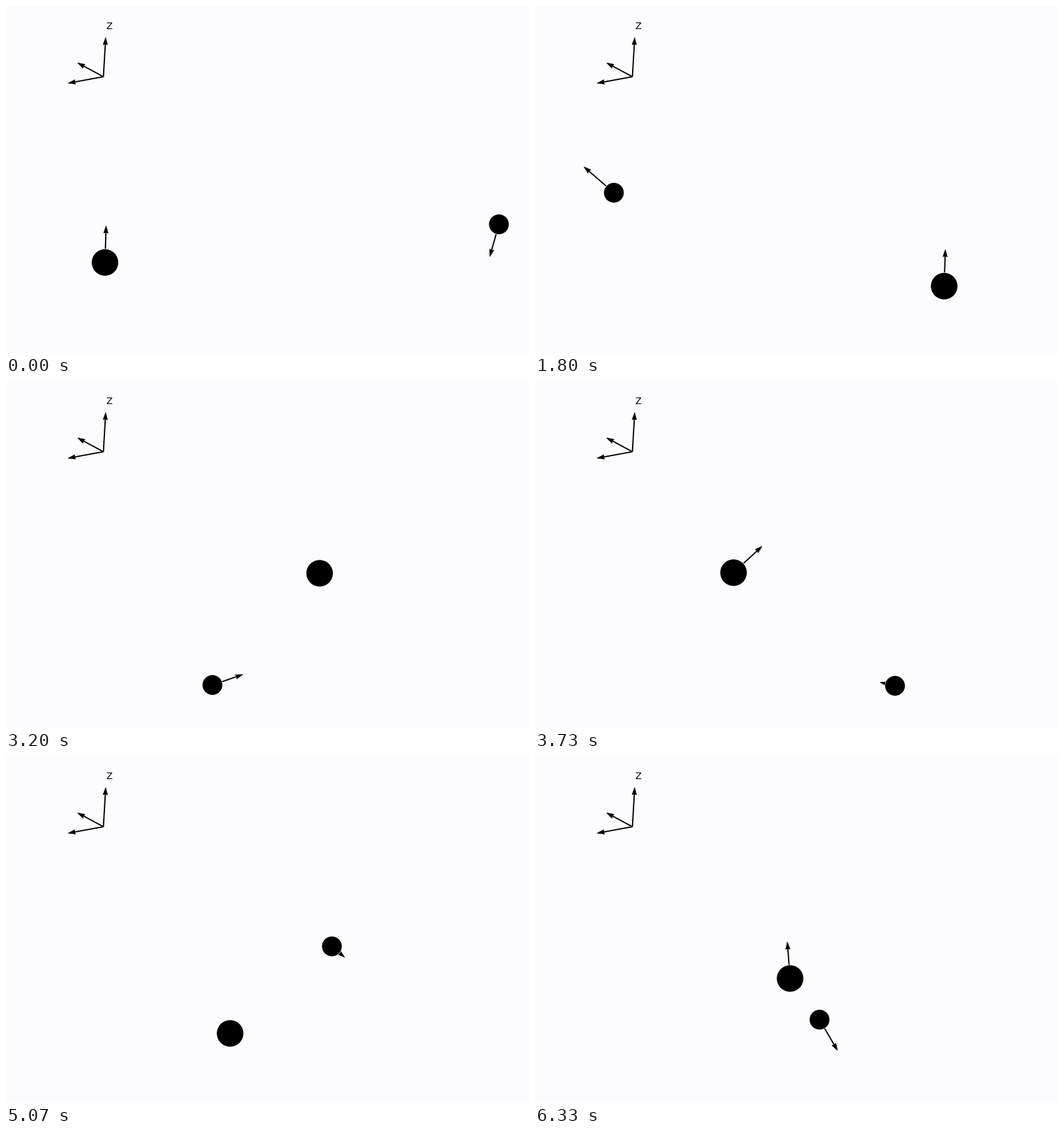
A matplotlib script for the animation above (6360 ms loop, 792 px wide and 526 px high).

```python
import numpy as np
import matplotlib.pyplot as plt
from matplotlib.animation import FuncAnimation
from matplotlib.patches import Circle, Polygon

W, H, DPI = 792, 526, 100
PX = 72 / DPI             # one pixel in points
LOOP, TICK = 6360, 20
STEP = 100 / 3            # the picture is renewed 30 times a second
MERGER = 6367             # time at which the inspiral would end
BG, INK = "#fcfcfe", "black"
CENTER = np.array([405.4, 364.0])
SHARE = 0.4283             # mass share of the small body
SHEAR, FLAT = 0.055, 0.338  # projection of the orbital plane

fig = plt.figure(figsize=(W / DPI, H / DPI), dpi=DPI, facecolor=BG)
ax = fig.add_axes([0, 0, 1, 1])
ax.set_xlim(0, W)
ax.set_ylim(H, 0)
ax.axis("off")


def clock(t):
    """Inspiral phase from 0 to 1, faster and faster towards the merger."""
    return 1 - (1 - t / MERGER) ** 0.625


def orbit(c):
    """Offset of the small body from the big one, on screen."""
    wobble = 1.2 * np.sin(2 * np.pi * c) - 0.9 * np.sin(np.pi * c)
    a = np.radians(24.2 + 646.2 * c + wobble)
    d = (654 + 9 * c) * (1 - c) ** 0.4
    x = d * np.cos(a)
    return np.array([x, SHEAR * x - FLAT * d * np.sin(a)])


# Spin angles in degrees at a few times
TIMES = np.array([0, 1030, 2630, 3730, 4530, 5570, 6330])
BIG_TURN = [88, 348, 563, 746, 851, 1171, 1535]
SMALL_TURN = [254, 400, 648, 837, 990, 1317, 1743]


def cone(c, turns, rx, ry, lift):
    """Tip of a spin vector that circles a raised or lowered centre."""
    a = np.radians(np.interp(c, clock(TIMES), turns))
    return np.array([rx * np.cos(a), -lift - ry * np.sin(a)])


def big_spin(c):
    return cone(c, BIG_TURN, 48, 27.5, 28)


def small_spin(c):
    lift = 95 * c ** 0.2 * np.exp(-(c / 0.4) ** 4) - 32.5
    return cone(c, SMALL_TURN, 50, 17, lift)


class Arrow:
    def __init__(self, z=1):
        self.line, = ax.plot([], [], color=INK, lw=1.9 * PX,
                             solid_capstyle="butt", zorder=z)
        self.head = Polygon(np.zeros((4, 2)), fc=INK, ec=INK, lw=0.6 * PX,
                            joinstyle="miter", zorder=z)
        ax.add_patch(self.head)

    def place(self, tail, vec):
        tail, vec = np.asarray(tail, float), np.asarray(vec, float)
        tip = tail + vec
        along = vec / max(np.hypot(*vec), 1e-6)
        side = np.array([-along[1], along[0]]) * 3.4
        base = tip - 11 * along
        self.line.set_data(*zip(tail, tip - 8 * along))
        self.head.set_xy([tip, base + side, base + along, base - side])


class Body:
    def __init__(self, radius, spin, z):
        self.spin = spin
        self.arrow = Arrow(z)
        self.discs = [Circle((0, 0), radius + 0.7, fc=BG, ec="none", zorder=z + 1),
                      Circle((0, 0), radius, fc=INK, ec="none", zorder=z + 2)]
        for disc in self.discs:
            ax.add_patch(disc)

    def place(self, pos, c):
        for disc in self.discs:
            disc.center = pos
        self.arrow.place(pos, self.spin(c))


for vec in [(3.5, -59.5), (-39, -21), (-53.5, 9.8)]:
    Arrow().place((147.5, 107.2), vec)
ax.text(151.3, 35, "Z", color=INK, fontname="DejaVu Sans",
        fontsize=14 * PX, va="baseline")

big = Body(20.1, big_spin, 2)
small = Body(15.0, small_spin, 6)


def draw(i):
    k = int((i * TICK + TICK / 2 + 3.4) / STEP)
    c = clock(10 * round(k * STEP / 10))
    gap = orbit(c)
    big.place(CENTER - SHARE * gap, c)
    small.place(CENTER + (1 - SHARE) * gap, c)
    return []


anim = FuncAnimation(fig, draw, frames=LOOP // TICK, interval=TICK,
                     init_func=lambda: [], repeat=True, repeat_delay=0)
plt.show()
```
